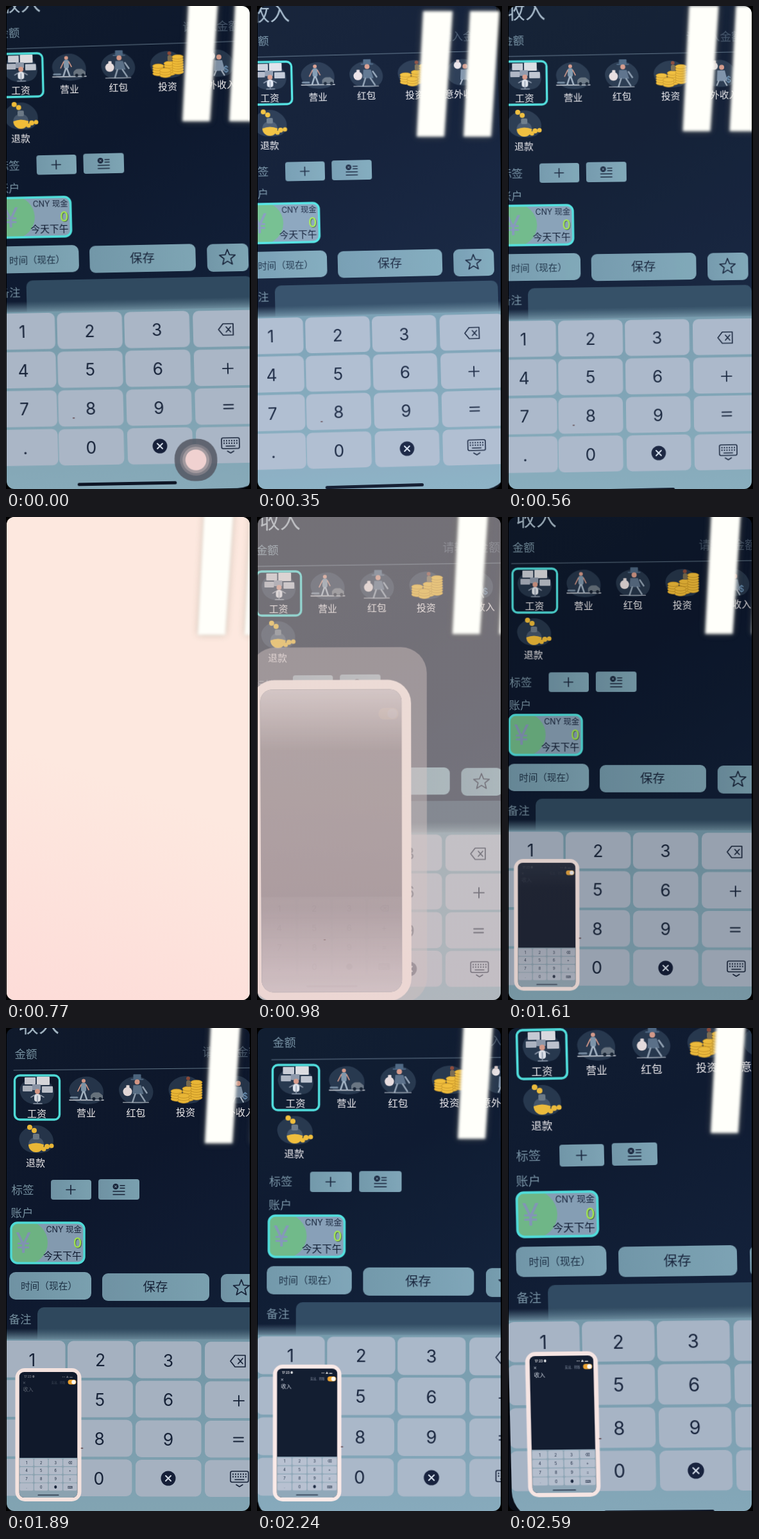
These frames come from a looping animation (382 px wide and 754 px high, 2660 ms). An HTML page:

```html
<!DOCTYPE html>
<html lang="zh">
<head>
<meta charset="utf-8">
<style>
html, body { margin: 0; width: 100%; height: 100%; overflow: hidden; background: #000; }
#stage { position: absolute; left: 0; top: 0; width: 382px; height: 754px; overflow: hidden;
  background: #070b13; clip-path: inset(0 2px 0 1px round 12px); }
#stage > * { position: absolute; left: 0; top: 0; width: 382px; height: 754px; }
#stage > #screen { left: -30px; top: -110px; width: 480px; height: 920px; transform-origin: 30px 110px; }
#lift { background: #6f87ad; }
#flash { background: linear-gradient(200deg, #fde8df 55%, #fddcd8); }
text { font-family: Inter, "Noto Sans CJK SC", "Noto Sans CJK", "Noto Sans", sans-serif;
  text-anchor: middle; dominant-baseline: central; }
</style>
</head>
<body>
<div id="stage">
  <svg id="screen" viewBox="-30 -110 480 920">
    <defs>
      <linearGradient id="navy" x1="0" y1="0" x2=".3" y2="1">
        <stop offset="0" stop-color="#101b2c"/><stop offset=".45" stop-color="#0d182d"/><stop offset="1" stop-color="#14233d"/>
      </linearGradient>
      <linearGradient id="btn" x1="0" y1="0" x2="1" y2="0">
        <stop offset="0" stop-color="#7297a8"/><stop offset="1" stop-color="#7ea5b4"/>
      </linearGradient>
      <linearGradient id="edge" x1="0" y1="0" x2="0" y2="1">
        <stop offset="0" stop-color="#5b7a8c" stop-opacity="0"/><stop offset="1" stop-color="#7696a6"/>
      </linearGradient>
      <linearGradient id="pad" x1="0" y1="0" x2="0" y2="1">
        <stop offset="0" stop-color="#769aaa"/><stop offset="1" stop-color="#87aab9"/>
      </linearGradient>
      <linearGradient id="veilFill" x1="0" y1="0" x2="0" y2="1">
        <stop offset="0" stop-color="#d8ccd0"/><stop offset=".2" stop-color="#8e8289"/>
        <stop offset=".72" stop-color="#857a85"/><stop offset="1" stop-color="#c9bfc8"/>
      </linearGradient>
      <clipPath id="face"><rect x="-9" y="-90" width="424" height="862" rx="42"/></clipPath>
      <clipPath id="card"><rect x="7" y="304" width="115" height="63" rx="10"/></clipPath>
      <clipPath id="mini"><rect x="6" y="6" width="91" height="196" rx="8"/></clipPath>
    </defs>
    <g id="app" clip-path="url(#face)"></g>
  </svg>
  <div id="lift"></div>
  <div id="flash"></div>
  <svg id="glare" viewBox="0 0 382 754">
    <defs>
      <filter id="soft" x="-30%" y="-10%" width="160%" height="120%"><feGaussianBlur stdDeviation="2"/></filter>
      <filter id="halo" x="-60%" y="-10%" width="220%" height="120%"><feGaussianBlur stdDeviation="6"/></filter>
    </defs>
    <g id="bars"></g>
  </svg>
</div>
<script>
const $ = id => document.getElementById(id);
const attrs = o => Object.entries(o).map(([k, v]) => ` ${k}="${v}"`).join('');
const rect = (x, y, w, h, r, fill, o = {}) =>
  `<rect x="${x}" y="${y}" width="${w}" height="${h}" rx="${r}" fill="${fill}"${attrs(o)}/>`;
const text = (s, x, y, size, fill, o = {}) =>
  `<text x="${x}" y="${y}" font-size="${size}" fill="${fill}"${attrs(o)}>${s}</text>`;
const disc = (x, y, r, fill, o = {}) => `<circle cx="${x}" cy="${y}" r="${r}" fill="${fill}"${attrs(o)}/>`;
const line = (d, color, w = 1.6) =>
  `<path d="${d}" fill="none" stroke="${color}" stroke-width="${w}" stroke-linecap="round" stroke-linejoin="round"/>`;
const shape = (d, fill) => `<path d="${d}" fill="${fill}"/>`;
const at = (x, y, s) => `<g transform="translate(${x} ${y})">${s}</g>`;

const INK = '#18243a', CYAN = '#50e0dc', DIM = '#7893a3', GOLD = '#f0bc38', SKIN = '#d79a88';
const BLOB = shape('M-26 3C-29-10-16-19-6-21 8-25 20-15 24-8 31 4 25 18 14 20 0 23-22 22-26 3Z', '#26364b');

const coins = (x, y, n) => Array.from({ length: n }, (_, i) =>
  `<ellipse cx="${x}" cy="${y - i * 4}" rx="9" ry="3.6" fill="${GOLD}" stroke="#b98720" stroke-width=".7"/>`).join('');

const icons = [
  BLOB + rect(-19, -21, 17, 11, 1, '#c9ccd4') + rect(0, -22, 20, 13, 1, '#dcdce0') + rect(-22, -8, 15, 9, 1, '#aeb4c0') +
    rect(8, -7, 17, 10, 1, '#bfc4ce') + rect(-7, -10, 13, 9, 1, '#8d97a8') + disc(1, 1, 4, SKIN) +
    rect(-4, 5, 10, 12, 4, '#dfe3ea') + line('M1 8V20M-5 20H8M-9 10L-4 7M11 10L6 7', '#8f9aaa', 1.5),
  BLOB + line('M-26 15H27', '#d5d9df', 1.5) + disc(-4, -15, 3, SKIN) + rect(-8, -12, 8, 14, 3, '#7e95a9') +
    line('M-5 2L-9 14M-3 2L1 14', '#a7b6c5', 2.5) + line('M-8-9L-13 1M0-9L4-1', SKIN, 1.6) +
    shape('M7 13V8Q10 3 14 3H20Q24 6 26 8V13Z', '#69747f') + disc(12, 13, 2.5, '#15202f') + disc(22, 13, 2.5, '#15202f') +
    line('M-24 11H-14', '#6e8296', 3),
  BLOB + rect(-4, -25, 12, 8, 1, '#4d6680') + line('M-7-17H11', '#4d6680', 2) + disc(2, -13, 4, SKIN) +
    shape('M-4-8H8L12 6H-5Z', '#5b7087') + line('M-1 6L-5 18M7 6L14 17M11-5L17 4', '#91a0b0', 2.5) +
    disc(-13, 2, 7, '#e8dddd') + rect(-15, -8, 5, 5, 1, '#e8dddd') + line('M-20 19H20', '#c9ced6', 1),
  BLOB + coins(-14, 14, 4) + coins(4, 14, 5) + coins(17, 12, 7) + coins(-3, 17, 3) +
    disc(4, -18, 3, '#8b4a39') + rect(1, -15, 7, 10, 3, '#7a6c50'),
  BLOB + disc(-8, -12, 6, '#e8e1e2') + rect(-10, -21, 5, 5, 1, '#d8c9c8') + disc(4, -10, 4, SKIN) +
    shape('M-3-5H9L13 12H-4Z', '#7d90a6') + line('M-1 12L-4 19M8 12L12 19', '#b1bcc9', 2) + text('$', 15, 10, 13, '#79a4ca'),
  BLOB + disc(0, 8, 12, '#46566a') + shape('M-12 8A12 12 0 0 0 12 8Q0 3-12 8Z', GOLD) +
    rect(-5, -9, 10, 9, 2, '#6c7986') + disc(-10, -19, 4, GOLD) + disc(-3, -14, 4, GOLD) + disc(17, 11, 4, GOLD) +
    disc(24, 10, 3.5, GOLD) + disc(12, 15, 3.5, GOLD)
];
const places = [[48, '工资'], [125, '营业'], [202.5, '红包'], [280, '投资'], [358, '意外收入']];

function form() {
  const label = { 'font-weight': 500 };
  let s = rect(-9, -90, 424, 862, 42, 'url(#navy)') +
    text('收入', 51, -5, 32, '#a5b7c5') + text('金额', 31, 40, 17.5, DIM) +
    text('请输入金额', 351, 37, 18, '#46566a') + line('M12 66L398 62', '#617688', 1);
  places.forEach(([x, name], i) => {
    s += at(x, 98 - i * .4, icons[i]) + text(name, x, 133 - i * .4, 15, '#f4f1f2', label);
  });
  s += at(47, 174, icons[5]) + text('退款', 46, 210, 15, '#f4f1f2', label) +
    rect(13.5, 74, 70, 69, 8, 'none', { stroke: CYAN, 'stroke-width': 3.4 });
  s += text('标签', 26, 252, 17.5, DIM) + rect(70, 237, 63, 31, 4, 'url(#btn)') + rect(144, 236, 64, 32, 4, 'url(#btn)') +
    line('M94 252.5H108M101 245.5V259.5', INK) + disc(171, 247.5, 4.5, INK) +
    line('M169.5 246L172.5 249M172.5 246L169.5 249', '#8fb0bd', 1) + line('M178 246H185M178 250H185M167 255H185M167 260H185', INK, 1.4) +
    text('账户', 25, 288, 17.5, DIM);
  s += `<g clip-path="url(#card)">${rect(7, 304, 115, 63, 0, '#879fb4')}${disc(31, 335, 34, '#70b886')}</g>` +
    text('¥', 27, 335, 44, '#8496b6') +
    text('CNY 现金', 118, 314.5, 12.5, INK, { style: 'text-anchor:end' }) +
    text('0', 112.5, 336.5, 21, '#4c6a50', label) + text('0', 111.5, 335.5, 21, '#a4e84e', label) +
    text('今天下午', 118, 355, 15, '#101b30', { style: 'text-anchor:end' }) +
    rect(8, 304, 114, 63, 10, 'none', { stroke: CYAN, 'stroke-width': 3.4 });
  const star = Array.from({ length: 10 }, (_, i) => {
    const r = i % 2 ? 5.6 : 13, a = i * Math.PI / 5;
    return `${367 + r * Math.sin(a)} ${406 - r * Math.cos(a)}`;
  }).join('L');
  s += rect(5, 381, 128, 43, 10, 'url(#btn)') + text('时间（现在）', 67, 403, 14.7, '#1d3044') +
    rect(150, 383, 167, 43, 9, 'url(#btn)') + text('保存', 233, 404, 19.5, INK, label) +
    rect(335, 384, 65, 44, 9, 'url(#btn)') + line(`M${star}Z`, INK, 1.7) +
    text('备注', 22, 454, 17.5, DIM) + rect(49, 436, 356, 70, 10, '#304a60');
  return s;
}

function keypad() {
  let s = rect(-9, 469, 424, 19, 0, 'url(#edge)') + rect(-9, 486, 424, 286, 0, 'url(#pad)');
  const keys = ['1', '2', '3', '', '4', '5', '6', '+', '7', '8', '9', '=', '.', '0', '', ''];
  keys.forEach((k, i) => {
    const r = i >> 2, c = i % 4;
    const x = [41, 147, 253, 361][c] - (c == 1 ? r * .7 : 0), y = 516.5 + r * 61.6 + c * .6;
    s += rect(x - 51, y - 28.5, 102.5, 57.5, 9, '#aab6c6');
    if (k == '+') s += line(`M${x - 6} ${y + 2}H${x + 10}M${x + 2} ${y - 6}V${y + 10}`, INK, 1.9);
    else if (k == '=') s += line(`M${x - 6} ${y - 2}H${x + 9}M${x - 6} ${y + 4}H${x + 9}`, INK, 1.8);
    else if (k) s += text(k, x, y + 1, 26.5, INK);
  });
  s += line('M350 520L357 511H373V529H357ZM362 516L369 524M369 516L362 524', INK, 1.7) +
    disc(253, 703, 11.5, '#16203a') + line('M249 699L257 707M257 699L249 707', '#d5deea', 2) +
    rect(350, 692, 28, 17, 2.5, 'none', { stroke: INK, 'stroke-width': 1.6 }) +
    `<path d="M353 696.5H376M353 700.5H376" stroke="${INK}" stroke-width="2" stroke-dasharray="2 2"/>` +
    line('M357 705H371M359 713L364 716L369 713', INK, 1.6) +
    rect(122, 759, 156, 5, 2.5, '#0d1525');
  return s;
}

function preview() {
  let s = rect(0, 0, 103, 208, 15, '#fbe9e5') + `<g clip-path="url(#mini)">` + rect(6, 6, 91, 196, 0, '#111a2c');
  s += rect(6, 140, 91, 62, 0, '#8fa7b5');
  for (let i = 0; i < 16; i++) {
    const x = 7 + i % 4 * 22.6, y = 141.5 + (i >> 2) * 12.7, k = '123⌫456+789=.0●⌨'[i];
    s += rect(x, y, 21.2, 11.6, 1.8, '#b7c0ce') + text(k, x + 10.6, y + 6, 5.5, INK);
  }
  s += rect(35, 197.5, 33, 1.3, .6, INK) + `<g id="miniText">` +
    text('17:23 ●', 22, 13, 4.5, '#eee', { 'font-weight': 700 }) + text('▪▪ ▲ ▬', 81, 13, 4.5, '#ddd') +
    text('×', 14, 22, 8, '#bcc5d0') + text('收入', 20, 33, 8, '#d5dce4') + text('支出、转账', 67, 22, 4.4, '#8a96a6') + '</g>' +
    rect(82, 18, 13, 7.5, 3.7, '#f0a52f') + disc(91, 21.7, 3.2, '#fff') +
    `<g id="veil">${rect(6, 6, 91, 196, 0, 'url(#veilFill)')}</g></g>`;
  return s;
}

$('app').innerHTML = form() + keypad() +
  `<g id="trail" opacity=".45">${rect(0, 0, 103, 208, 15, '#cfc0c4')}</g><g id="thumb">${preview()}</g>` +
  `<g id="touch">${rect(275.5, 692.5, 67, 67, 31, '#565b66', { opacity: .88 })}` +
  disc(309, 726, 25, '#7d7c85') + disc(309, 726, 21, '#a39a9f') + disc(309, 726, 16.5, '#f0d1d0') + '</g>' +
  `<ellipse cx="118.5" cy="656" rx="2" ry="1" fill="#6d5a60"/>`;

const bar = 'M309-12H355L342 184H299Z';
const beam = `<path d="${bar}" fill="#8f8a78" opacity=".45" filter="url(#halo)"/><path d="${bar}" fill="#fffffa" filter="url(#soft)"/>`;
$('bars').innerHTML = beam + at(73, 0, beam);

// Camera pose: four landmarks on the phone, then the reflection's offset
const times = [0, 350, 770, 1260, 1890, 2240, 2590];
const poses = [
  [23, 132, 252, 126, 240, 687, 133, 688, -24, -4],
  [20, 144, 246, 139, 234, 691, 128, 693, -50, 20],
  [32, 143, 262, 141, 237, 704, 131, 704, 0, 0],
  [35, 144, 265, 142, 240, 705, 133.5, 704, 5, 0],
  [48, 133, 280, 132, 253, 703, 145, 702, 11, -4],
  [60, 118, 300, 117, 272, 702, 160, 701, 14, -11],
  [53, 68, 310, 62, 293, 691, 174, 691, 17, -20]
];
const bright = [1, 1.08, 1, .78, .97, 1.02, 1];
const lifted = [0, .09, .05, 0, 0, .03, .03];

const clamp = v => Math.max(0, Math.min(1, v));
function spot(ts, t) {
  let i = 0;
  while (i < ts.length - 2 && t >= ts[i + 1]) i++;
  return [i, clamp((t - ts[i]) / (ts[i + 1] - ts[i]))];
}
function linear(ts, vs, t) {
  const [i, u] = spot(ts, t);
  return vs[i] + (vs[i + 1] - vs[i]) * u;
}
function smooth(ts, vs, t) {
  const [i, u] = spot(ts, t), n = ts.length - 1, h = ts[i + 1] - ts[i];
  const slope = k => {
    const a = Math.max(0, k - 1), b = Math.min(n, k + 1);
    return (vs[b] - vs[a]) / (ts[b] - ts[a]) * h;
  };
  const u2 = u * u, u3 = u2 * u;
  return (2 * u3 - 3 * u2 + 1) * vs[i] + (u3 - 2 * u2 + u) * slope(i) +
    (3 * u2 - 2 * u3) * vs[i + 1] + (u3 - u2) * slope(i + 1);
}

// Projective map of the unit square onto a quad
function quad([x0, y0, x1, y1, x2, y2, x3, y3]) {
  const ax = x1 - x2, bx = x3 - x2, sx = x0 - x1 + x2 - x3;
  const ay = y1 - y2, by = y3 - y2, sy = y0 - y1 + y2 - y3;
  const det = ax * by - bx * ay, g = (sx * by - bx * sy) / det, h = (ax * sy - sx * ay) / det;
  return new DOMMatrix([
    x1 - x0 + g * x1, y1 - y0 + g * y1, 0, g,
    x3 - x0 + h * x3, y3 - y0 + h * y3, 0, h,
    0, 0, 1, 0, x0, y0, 0, 1]);
}
const rest = quad(poses[4]).inverse();

function shrink(t) {
  const k = Math.pow(1 - clamp((t - 800) / 800), 3), z = (103 + 321 * k) / 103;
  return `translate(${14.5 - 23.5 * k} ${739 + 33 * k - 208 * z}) scale(${z})`;
}

const LOOP = 2660, STEP = 70;
function draw(t) {
  const p = poses[0].map((_, j) => smooth(times, poses.map(q => q[j]), t));
  $('screen').style.transform = quad(p).multiply(rest).toString();
  $('screen').style.filter = `brightness(${linear(times, bright, t)})`;
  $('lift').style.opacity = linear(times, lifted, t);
  $('flash').style.opacity = linear([0, 560, 630, 700, 770, 840, 910, 980, 1050, 1190], [0, 0, .2, .9, 1, .92, .7, .42, .2, 0], t);
  $('bars').setAttribute('transform', `translate(${p[8]} ${p[9]})`);
  $('touch').setAttribute('opacity', 1 - clamp(t / 210));
  const shown = t >= 770;
  $('thumb').style.display = shown ? '' : 'none';
  $('trail').style.display = shown && t < 1500 ? '' : 'none';
  $('thumb').setAttribute('transform', shrink(t));
  $('trail').setAttribute('transform', shrink(t - 35));
  $('veil').setAttribute('opacity', linear([770, 1260, 1680], [1, .85, 0], t));
  $('miniText').setAttribute('opacity', linear([1500, 1890, 2240], [0, .4, 1], t));
}

const start = performance.now();
function tick() {
  const t = (performance.now() - start) % LOOP;
  draw(Math.floor(t / STEP) * STEP);
  requestAnimationFrame(tick);
}
tick();
</script>
</body>
</html>
```
